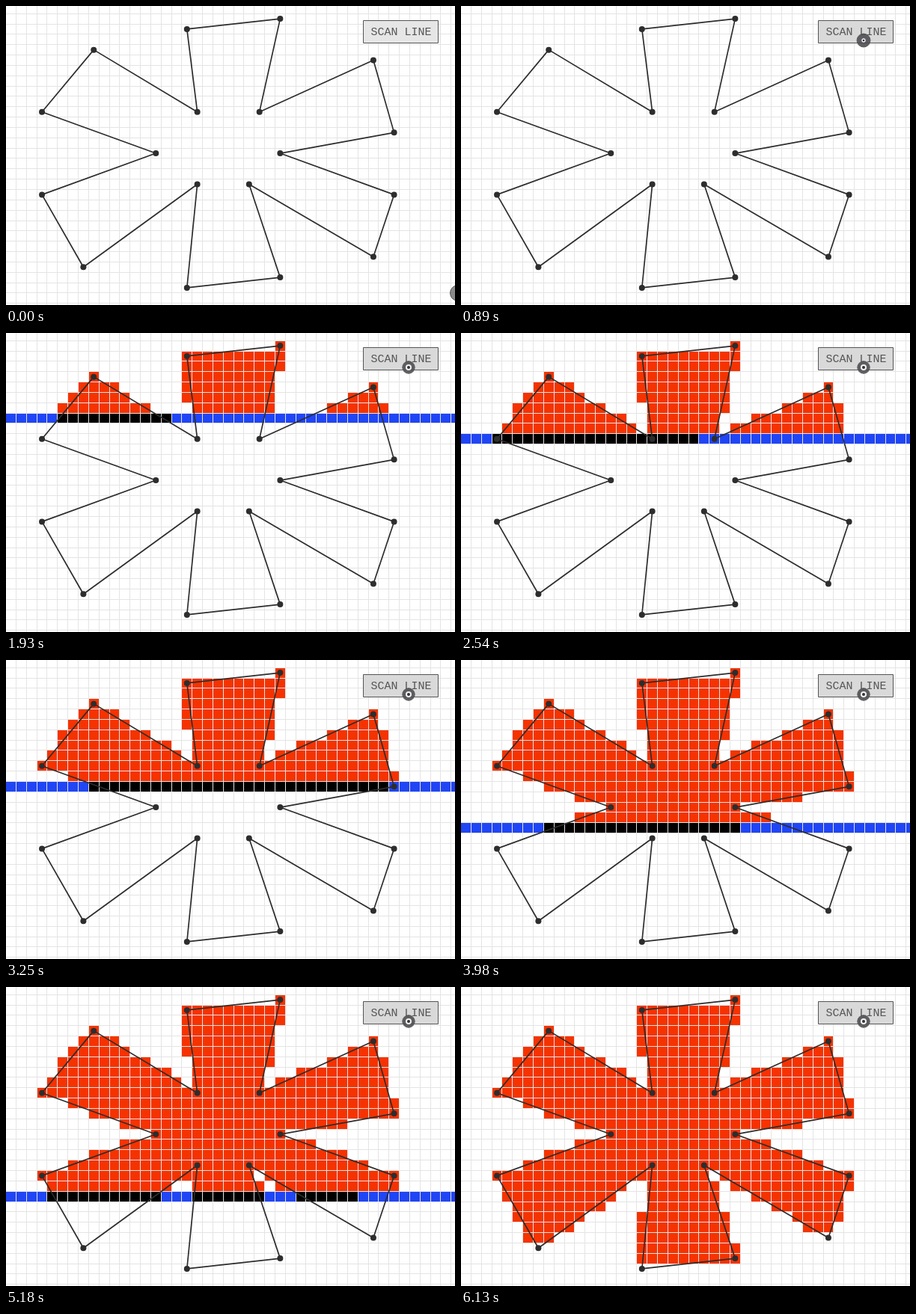
An HTML page with a canvas that plays this animation: 600x400 px, repeating every 6.45 s.

```html
<!DOCTYPE html>
<html lang="en">
<head>
<meta charset="utf-8">
<title>Scan line fill</title>
<style>
  html, body { margin: 0; width: 100%; height: 100%; overflow: hidden; background: #fff; }
  canvas { display: block; width: 600px; height: 400px; }
</style>
</head>
<body>
<canvas id="stage" width="600" height="400"></canvas>
<script>
const ctx = document.getElementById('stage').getContext('2d');
const LOOP = 6450;
const CELL = 13.84, LEFT = -0.4, TOP = 10.2;
const COLS = 44, ROWS = 26;
const RED = '#f53300', BLUE = '#2045f5', BLACK = '#000', INK = '#2d2d2d', GRID = '#e4e4e4';

// Polygon corners as [column, row] cells.
const polygon = [
  [26, 0], [24, 9], [35, 4], [37, 11], [26, 13], [37, 17], [35, 23], [23, 16], [26, 25],
  [17, 26], [18, 16], [7, 24], [3, 17], [14, 13], [3, 9], [8, 3], [18, 9], [17, 1]
];

// Runs of evenly spaced steps: [first ms, last ms, number of steps].
const runs = [
  [80, 720, 9], [800, 1370, 8], [1450, 2080, 9], [2160, 2780, 9], [2860, 3490, 9],
  [3570, 4140, 8], [4220, 4790, 8], [4870, 5510, 9], [5580, 6130, 8]
];

const FIRST_PRESS = 10;      // step at which the button is pressed
const SCAN_RATE = 8.444;     // cells per step
const SCAN_OFFSET = 101.648; // progress is negative until the scan begins
const ROW_PAUSE = 0.5;       // extra progress needed to change rows

const lineX = col => Math.floor(LEFT + col * CELL);
const lineY = row => Math.floor(TOP + row * CELL);
const center = ([col, row]) => [LEFT + (col + 0.5) * CELL, TOP + (row + 0.5) * CELL];

// Columns covered in one row, ordered from left to right.
function filledColumns(row) {
  const hits = [];
  polygon.forEach((a, i) => {
    const b = polygon[(i + 1) % polygon.length];
    const [hi, lo] = a[1] < b[1] ? [a, b] : [b, a];
    if (row >= hi[1] && row < lo[1]) {
      hits.push(hi[0] + (lo[0] - hi[0]) * (row - hi[1]) / (lo[1] - hi[1]));
    }
  });
  hits.sort((a, b) => a - b);
  const columns = new Set();
  for (let i = 0; i < hits.length; i += 2) {
    const end = Math.floor(hits[i + 1] + 0.5 + 1e-9);
    for (let c = Math.ceil(hits[i] - 0.5 - 1e-9); c <= end; c++) columns.add(c);
  }
  return [...columns];
}

let total = 0;
const rows = Array.from({ length: ROWS }, (_, index) => {
  const columns = filledColumns(index);
  const start = total;
  total += columns.length + ROW_PAUSE;
  return { columns, start, end: total };
});

function stepAt(time) {
  let step = 0;
  for (const [first, last, count] of runs) {
    if (time < first) break;
    const gap = (last - first) / (count - 1);
    step += Math.min(count, 1 + Math.floor((time - first + 10) / gap));
  }
  return step;
}

function disc(x, y, radius, fill) {
  ctx.beginPath();
  ctx.arc(x, y, radius, 0, Math.PI * 2);
  ctx.fillStyle = fill;
  ctx.fill();
}

function fillCells(row, columns, color) {
  ctx.fillStyle = color;
  const y = lineY(row) + 1, height = lineY(row + 1) - y;
  for (const c of columns) {
    const x = lineX(c) + 1;
    ctx.fillRect(x, y, lineX(c + 1) - x, height);
  }
}

function drawGrid() {
  ctx.fillStyle = GRID;
  for (let c = 1; c < COLS; c++) ctx.fillRect(lineX(c), 0, 1, 400);
  for (let r = 0; r < 29; r++) ctx.fillRect(0, lineY(r), 600, 1);
}

function drawScan(progress) {
  const everyColumn = Array.from({ length: COLS }, (_, c) => c);
  rows.forEach(({ columns, start, end }, row) => {
    if (progress >= end) {
      fillCells(row, columns, RED);
    } else if (progress >= start) {
      fillCells(row, everyColumn, BLUE);
      fillCells(row, columns.slice(0, Math.floor(progress - start)), BLACK);
    }
  });
}

function drawPolygon() {
  ctx.beginPath();
  polygon.forEach(p => ctx.lineTo(...center(p)));
  ctx.closePath();
  ctx.strokeStyle = INK;
  ctx.lineWidth = 1.7;
  ctx.lineJoin = 'round';
  ctx.stroke();
  polygon.forEach(p => disc(...center(p), 4, INK));
}

function drawButton(hovered) {
  ctx.fillStyle = hovered ? '#d9d9d9' : '#e6e6e6';
  ctx.fillRect(477, 19, 101, 30);
  ctx.strokeStyle = '#555';
  ctx.lineWidth = 1;
  ctx.strokeRect(477.5, 19.5, 100, 30);
  ctx.fillStyle = '#555';
  ctx.font = '15px "Liberation Mono", monospace';
  ctx.textAlign = 'center';
  ctx.textBaseline = 'alphabetic';
  ctx.fillText('SCAN LINE', 528, 39);
}

function drawPointer(step) {
  const p = Math.min(1, step / (FIRST_PRESS - 1));
  const eased = p * p * (3 - 2 * p);
  const x = 604 - 66 * eased, y = 384 - 338 * eased;
  const press = Math.max(0, Math.min(1, (step - FIRST_PRESS + 1) / 3));
  const radius = 10.5 - 2.3 * press;
  disc(x, y, radius, press ? 'rgba(75,75,80,0.88)' : 'rgba(110,110,110,0.8)');
  ctx.strokeStyle = '#5a5a5a';
  ctx.lineWidth = 1;
  ctx.stroke();
  if (press) {
    disc(x, y, 4 * press, '#f2f2f2');
    disc(x, y, 2 * press, '#333');
  }
}

function draw(time) {
  const step = stepAt(time % LOOP);
  ctx.fillStyle = '#fff';
  ctx.fillRect(0, 0, 600, 400);
  drawGrid();
  drawScan(step * SCAN_RATE - SCAN_OFFSET);
  drawPolygon();
  drawButton(step >= FIRST_PRESS);
  drawPointer(step);
}

const began = performance.now();
function tick() {
  draw(performance.now() - began);
  requestAnimationFrame(tick);
}
tick();
</script>
</body>
</html>
```
